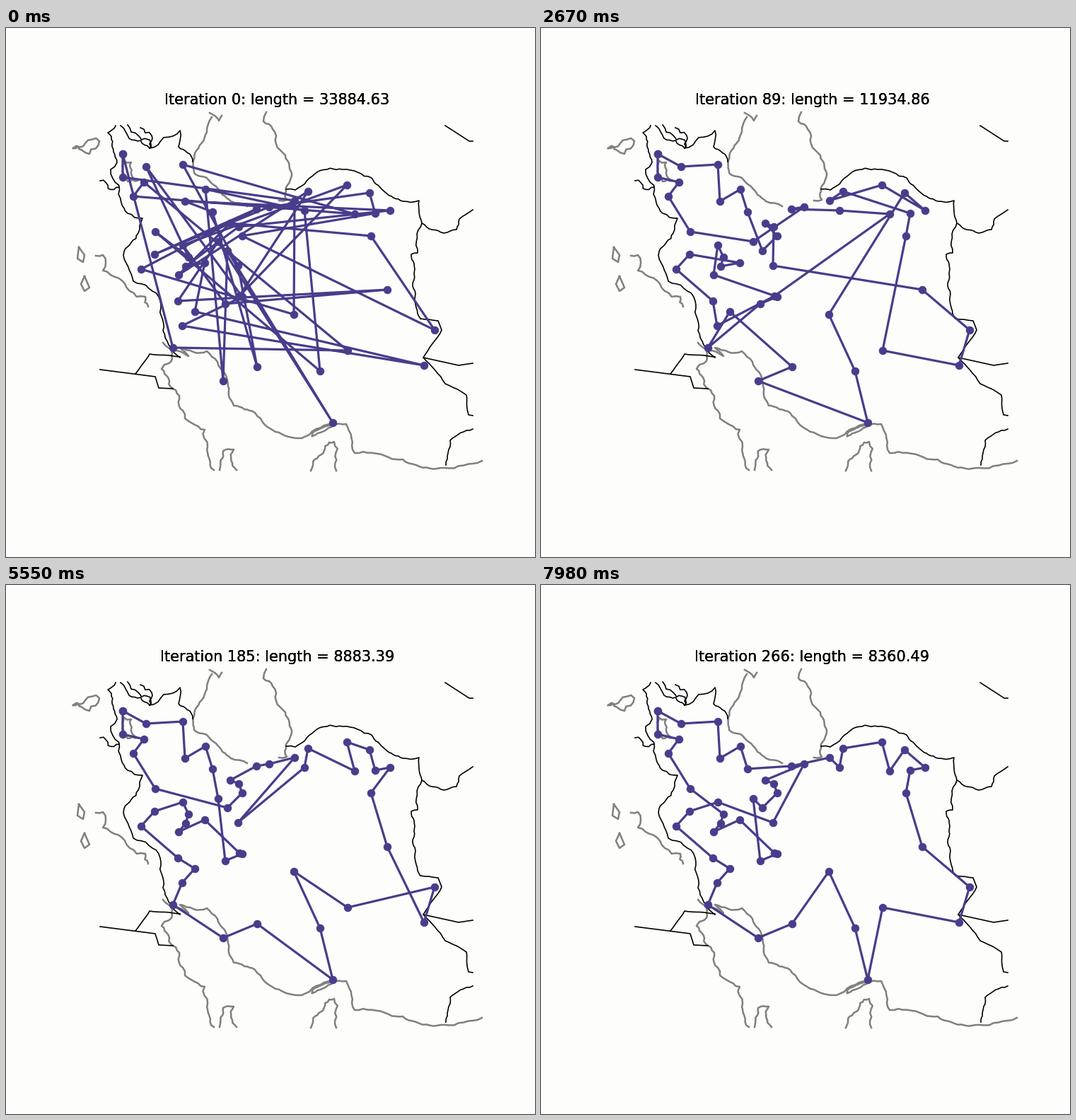
A matplotlib script that plays this animation: 748x748 px, repeating every 8000 ms.

```python
import math
import random

import matplotlib.pyplot as plt
from matplotlib.animation import FuncAnimation

SIZE, DPI = 748, 125
INK, PAPER = "darkslateblue", "#fdfdfc"

NAMES = "ABCDEFGHIJKLMNOPQRSTUVWXYZabcdefghijklmnopqrstuvwx"
SPOTS = [
    (165, 178), (198, 196), (250, 193), (165, 211), (195, 218), (180, 238),
    (211, 288), (253, 245), (282, 228), (292, 260), (354, 256), (372, 253),
    (408, 244), (422, 258), (427, 231), (482, 222), (493, 263), (514, 233),
    (543, 258), (522, 262), (516, 294), (539, 370), (606, 427), (591, 477),
    (483, 456), (462, 558), (444, 485), (407, 405), (355, 479), (307, 499),
    (236, 452), (249, 421), (267, 401), (243, 386), (191, 341), (210, 320),
    (250, 307), (258, 324), (254, 337), (244, 349), (281, 332), (330, 379),
    (334, 380), (310, 390), (300, 302), (313, 315), (334, 294), (329, 281),
    (317, 276), (328, 336),
]
CITY = dict(zip(NAMES, SPOTS))

# key tours: iteration, length in km, order of visits
STAGES = [
    (0, 33884.63, "ADMbiKjLRTuWUwnOpPkrVhsZtdINaGlBqfXgomvSHJcxCQFEYe"),
    (16, 20808.49, "ABmoSYUqbMRTHGIwdXVZuKJvNWaxLPOQgfstkrchjnliepCFED"),
    (52, 13988.31, "ABCHjihfxsvMPSRbadZcgerpQOunqVWXYUTNLIJtklmowKGFED"),
    (89, 11934.86, "ABCHIJtuwvxVWXYUTOMPSRbaZdcgerqnklmojihfpQNKLsGFED"),
    (157, 9596.85, "ABCHIJsxYWXVUSRTPQONbaZcdegfhijklmnopqrMLKwvutGFED"),
    (212, 8856.55, "ABCHIJMLKwvutsrqponmlkjihgfedcZabYWXVUTSRPQONxGFED"),
    (266, 8360.49, "ABCHIJKMNOPQRSTUVWXYZabcdefghijkxLwvutsrqponmlGFED"),
]


def gap(a, b):
    return math.dist(CITY[a], CITY[b])


def ring(tour):
    return zip(tour, tour[1:] + tour[:1])


def length(tour):
    return sum(gap(a, b) for a, b in ring(tour))


def reverse(tour, i, j):
    return tour[:i] + tour[i:j + 1][::-1] + tour[j + 1:]


def exchange(tour, goal):
    """The cheapest 2-opt exchange that brings the tour closer to the goal."""
    n = len(tour)
    wanted = {frozenset(e) for e in ring(goal)}

    def has(a, b):
        return frozenset((a, b)) in wanted

    options = []
    for i in range(1, n - 1):
        a, b = tour[i - 1], tour[i]
        for j in range(i + 1, n):
            c, d = tour[j], tour[(j + 1) % n]
            if has(a, c) + has(b, d) > has(a, b) + has(c, d):
                options.append((gap(a, c) + gap(b, d) - gap(a, b) - gap(c, d), i, j))
    if options:
        return reverse(tour, *min(options)[1:])
    k = next(k for k in range(n) if tour[k] != goal[k])
    return reverse(tour, k, tour.index(goal[k]))


def moves(tour, goal):
    path = [tour]
    while tour != goal:
        if goal[1] == tour[-1] or goal[-1] == tour[1]:
            tour = tour[0] + tour[:0:-1]
            if tour == goal:
                break
        tour = exchange(tour, goal)
        path.append(tour)
    path[-1] = goal
    return path


def build():
    steps = []
    for (t0, km0, start), (t1, km1, goal) in zip(STAGES, STAGES[1:]):
        path = moves(start, goal)
        last = len(path) - 1
        s0, s1 = km0 / length(start), km1 / length(goal)
        for t in range(t0, t1):
            k = round((t - t0) / (t1 - t0) * last)
            steps.append((path[k], length(path[k]) * (s0 + (s1 - s0) * k / last)))
    steps.append((goal, km1))
    return steps


fig = plt.figure(figsize=(SIZE / DPI, SIZE / DPI), dpi=DPI, facecolor=PAPER)
ax = fig.add_axes([0, 0, 1, 1])
ax.set_xlim(0, SIZE)
ax.set_ylim(SIZE, 0)
ax.axis("off")
rng = random.Random(4)


def split(p, q, wobble):
    """Fractal line from p to q, without its first point."""
    d = math.dist(p, q)
    if d < 7 or not wobble:
        return [q]
    k = rng.uniform(-wobble, wobble)
    mid = ((p[0] + q[0]) / 2 - (q[1] - p[1]) * k, (p[1] + q[1]) / 2 + (q[0] - p[0]) * k)
    return split(p, mid, wobble) + split(mid, q, wobble)


def trace(pts, wobble, **style):
    line = [pts[0]]
    for p, q in zip(pts, pts[1:]):
        line += split(p, q, wobble)
    ax.plot(*zip(*line), **style)


def border(*pts, wobble=0.15):
    trace(pts, wobble, color="black", lw=0.95, zorder=2)


def coast(*pts, wobble=0.2):
    trace(pts, wobble, color="#808080", lw=1.45, zorder=1)


# western border
border((155, 138), (144, 148), (152, 175), (157, 190), (148, 200), (163, 247),
       (172, 262), (193, 269), (187, 290), (167, 316), (180, 358), (218, 386),
       (222, 428), (230, 448), (246, 466))
border((133, 216), (160, 225), wobble=0.3)
# northern borders
border((162, 138), (174, 156), (203, 170), (246, 145), (244, 168), (264, 189))
border((172, 137), (187, 152), (203, 170), wobble=0.3)
border((190, 141), (206, 152), (205, 168), wobble=0.3)
border((621, 138), (655, 160), (660, 160), wobble=0)
# eastern borders
border((396, 228), (409, 229), (441, 203), (476, 200), (517, 212), (561, 245),
       (584, 244), (588, 276), (582, 318), (573, 320), (577, 348), (586, 411),
       wobble=0.1)
border((586, 411), (611, 414), (616, 427), (590, 466), (621, 503), (651, 519),
       (654, 547), (660, 548), wobble=0.04)
border((588, 276), (619, 290), (637, 285), (641, 270), (660, 257), wobble=0.1)
border((590, 466), (640, 477), (660, 474), wobble=0)
border((660, 567), (628, 583), (622, 618), wobble=0.1)
# southern borders
border((133, 483), (211, 493), (216, 509), (236, 510), wobble=0)
border((183, 489), (203, 461), (246, 465), wobble=0.03)

# gulf
coast((222, 445), (235, 460), (220, 482), (236, 510), (250, 541), (281, 568),
      (285, 592), (294, 625))
coast((302, 625), (307, 598), (322, 596), (326, 625))
coast((236, 456), (258, 464), (246, 452), (284, 457), (299, 472), (322, 534),
      (352, 544), (386, 572), (418, 580), (462, 560), (481, 560), (493, 601),
      (541, 607), (620, 622), (673, 612), wobble=0.1)
coast((433, 577), (463, 562), (433, 573), (433, 577), wobble=0.1)
coast((431, 626), (464, 585), (467, 626))
# northern sea
coast((288, 120), (301, 131), (305, 124), wobble=0.1)
coast((291, 126), (284, 147), (267, 177), (266, 205), (297, 224), (318, 245),
      (341, 252), wobble=0.1)
coast((368, 119), (364, 132), (377, 143), (382, 164), (395, 180), (397, 243),
      (386, 244), wobble=0.15)
# lakes and river
coast((95, 170), (112, 163), (132, 160), (118, 178), (95, 170), wobble=0.3)
coast((166, 187), (177, 190), (186, 216), (172, 217), (166, 187))
coast((103, 310), (111, 321), (109, 331), (101, 326), (103, 310), wobble=0)
coast((111, 351), (118, 367), (111, 372), (106, 362), (111, 351), wobble=0)
coast((127, 322), (137, 321), (137, 343), (175, 372), (197, 380), (201, 394))

route, = ax.plot([], [], "o-", color=INK, lw=1.85, ms=6, mew=0.6, zorder=3)
# repeated passes give the title its heavy edges
titles = [ax.text(383.5, 108, "", ha="center", va="baseline", fontsize=12,
                  family="DejaVu Sans", color="black") for _ in range(3)]
STEPS = build()


def draw(i):
    step = min(math.ceil(i * 2 / 3), len(STEPS) - 1)
    tour, km = STEPS[step]
    route.set_data(*zip(*(CITY[c] for c in tour + tour[0])))
    for text in titles:
        text.set_text(f"Iteration {step}: length = {km:.2f}")
    return [route, *titles]


anim = FuncAnimation(fig, draw, frames=400, interval=20, init_func=lambda: draw(0),
                     repeat=True, repeat_delay=0)
plt.show()
```
